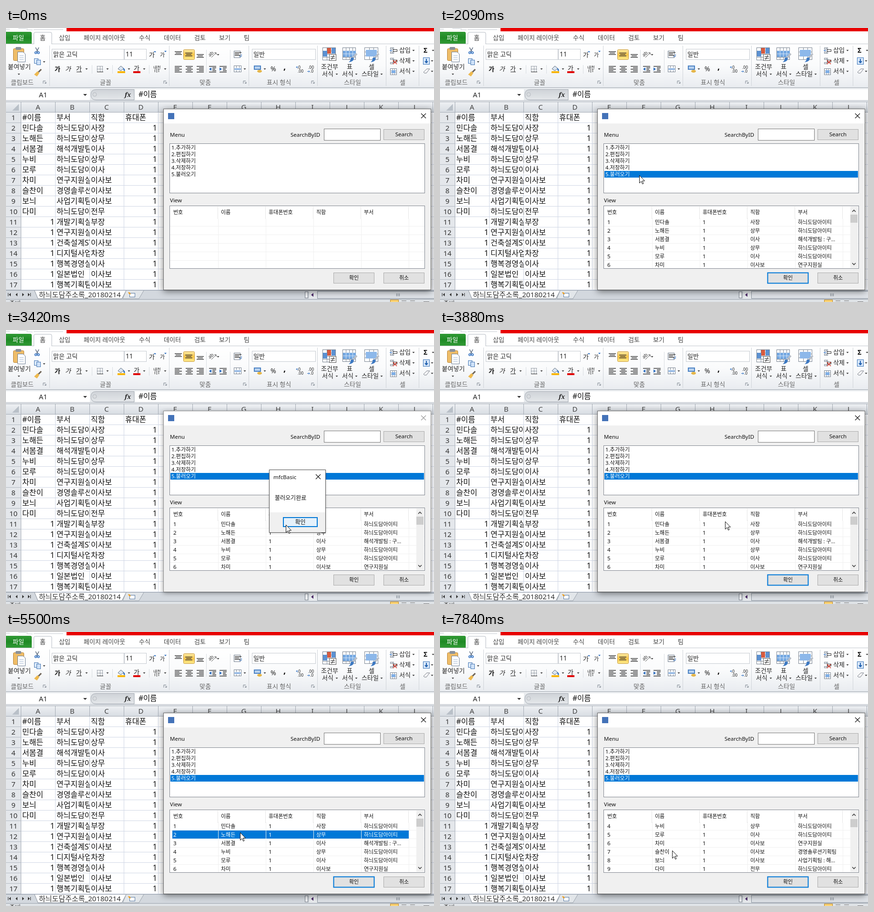
Write an HTML page that moves like this. It is 898 px wide and 577 px high and loops after 8 s.

```html
<!DOCTYPE html>
<html lang="ko">
<head>
<meta charset="utf-8">
<style>
html, body { margin: 0; width: 100%; height: 100%; overflow: hidden; background: #fff; }
svg { display: block; width: 898px; height: 577px; }
text { font-family: "Noto Sans", "Noto Sans CJK KR", "Noto Sans CJK JP", sans-serif; white-space: pre; }
</style>
</head>
<body>
<svg id="stage" viewBox="0 0 898 577" xmlns="http://www.w3.org/2000/svg"></svg>
<script>
const LOOP = 8000, BLUE = '#0078d7';
const range = n => [...Array(n).keys()];

// Markup helpers
const rect = (x, y, w, h, fill, more = '') => `<rect x="${x}" y="${y}" width="${w}" height="${h}" fill="${fill}" ${more}/>`;
const box = (x, y, w, h, fill, stroke, more = '') => rect(x + .5, y + .5, w - 1, h - 1, fill, `stroke="${stroke}" ${more}`);
const path = (d, stroke, width = 1, fill = 'none') => `<path d="${d}" fill="${fill}" stroke="${stroke}" stroke-width="${width}"/>`;
const shape = (d, fill) => `<path d="${d}" fill="${fill}"/>`;
const text = (x, y, s, size = 13, fill = '#222', more = '') => `<text x="${x}" y="${y}" font-size="${size}" fill="${fill}" ${more}>${s}</text>`;
const mid = 'text-anchor="middle"', end = 'text-anchor="end"';
const hline = (x, y, w, c) => rect(x, y, w, 1, c);
const vline = (x, y, h, c) => rect(x, y, 1, h, c);
const drop = (x, y) => shape(`M${x - 2.5} ${y - 1}h5l-2.5 3z`, '#444');
const cross = (x, y, id) => `<path ${id ? `id="${id}"` : ''} d="M${x - 5} ${y - 5}l10 10m0-10l-10 10" stroke="#111" stroke-width="1.1"/>`;

const people = [
  ['민다솔', '사장', '하늬도담아이티'], ['노해든', '상무', '하늬도담아이티'],
  ['서봄결', '이사', '해석개발팀 : 구...'], ['누비', '상무', '하늬도담아이티'],
  ['모루', '이사', '하늬도담아이티'], ['차미', '이사보', '연구지원실'],
  ['슬찬이', '이사보', '경영솔루션기획팀'], ['보늬', '이사보', '사업기획팀 : 해...'],
  ['다미', '전무', '하늬도담아이티']];
const extra = [['개발기획실', '부장'], ['연구지원실', '이사보'], ['건축설계ST', '이사보'], ['디지털사업', '차장'],
  ['행복경영실', '이사'], ['일본법인', '이사보'], ['행복기획팀', '이사보']];

function defs() {
  const fade = (id, ...stops) => `<linearGradient id="${id}" x2="0" y2="1">${stops.map((c, i) =>
    `<stop offset="${i / (stops.length - 1)}" stop-color="${c}"/>`).join('')}</linearGradient>`;
  const clip = (id, x, y, w, h) => `<clipPath id="${id}">${rect(x, y, w, h, '#000')}</clipPath>`;
  return `<defs>${fade('ribbon', '#fff', '#fafbfc', '#e9ecf0')}${fade('file', '#319a35', '#1f8a25', '#319a35')}
    ${fade('head', '#eef0f3', '#d7dce2')}${fade('pill', '#cfd3d8', '#e4e7ea')}${fade('hot', '#fde9a5', '#fbc749', '#fdeb8f')}
    ${clip('colB', 104, 178, 72, 375)}${clip('rows', 344, 399, 516, 106)}</defs>`;
}

// Ribbon icons
const bars = (x, y, widths) => widths.map((w, i) => rect(x + (15 - w) / 2, y + i * 3, w, 1.4, '#333')).join('');
const leftBars = (x, y, widths) => widths.map((w, i) => rect(x, y + i * 3, w, 1.4, '#333')).join('');
const grid = (x, y, w, h, nx, ny, fill = '#fff', line = '#7d8794') => box(x, y, w, h, fill, line) +
  range(nx - 1).map(i => vline(x + Math.round((i + 1) * w / nx), y, h, line)).join('') +
  range(ny - 1).map(i => hline(x, y + Math.round((i + 1) * h / ny), w, line)).join('');
const brush = (x, y) => path(`M${x + 13} ${y - 14}L${x + 4} ${y - 4}`, '#b9bec6', 4) +
  shape(`M${x + 6} ${y - 6}q3 8-10 10q5-4 4-9z`, '#3d79c2');

function ribbon() {
  const tabs = [[111, '삽입'], [163, '페이지 레이아웃'], [279, '수식'], [331, '데이터'], [395, '검토'], [447, '보기'], [499, '팀']];
  const groups = [[10, '클립보드'], [197, '글꼴'], [406, '맞춤'], [547, '표시 형식'], [709, '스타일'], [826, '셀']];
  let s = rect(127, 0, 771, 7, '#e80000') + path('M0 2.5h8M26 .5h16M44 0v4h12M58 3.5h62', '#c5cad0') +
    rect(0, 33, 898, 92, 'url(#ribbon)') + hline(0, 33, 898, '#c3c8ce') + hline(0, 125, 898, '#a3a9b1') +
    rect(0, 126, 898, 30, '#e9ecef') +
    shape('M0 8H51q3 0 3 3V33H0z', 'url(#file)') + text(14, 25, '파일', 13, '#fff') +
    path('M58.5 34V12q0-3 3-3H93q3 0 3 3V34', '#b4bac2', 1, '#fff') + text(71, 25, '홈', 13, '#333') +
    tabs.map(([x, t]) => text(x, 25, t, 13, '#444')).join('') +
    groups.map(([x, t]) => text(x, 119, t, 13, '#666')).join('') +
    [91, 342, 509, 653, 797, 866].map(x => vline(x, 37, 85, '#d0d4d9')).join('') +
    [81, 334, 501, 644].map(x => path(`M${x - 3} 117v-5.5h5m-2 2l3 3m0-3v3h-3`, '#7c858f')).join('') +
    [[27, 97], [80, 71], [240, 56], [287, 56], [169, 86], [213, 86], [258, 86], [290, 86], [334, 86], [445, 56], [501, 86],
     [641, 56], [543, 86], [694, 97], [735, 97], [788, 97], [855, 47], [855, 69], [855, 91], [896, 47], [894, 69], [894, 91]]
      .map(p => drop(...p)).join('');
  // Clipboard
  s += box(15, 43, 23, 26, '#efbd68', '#b98335', 'rx="2"') + rect(20, 40, 12, 6, '#8b929b', 'rx="2"') +
    path('M24.5 50.5H36L40.5 55V71.5H24.5z', '#6e7f95', 1, '#fff') + path('M28 58h9m-9 4h9m-9 4h9', '#9fb4d0') +
    text(4, 86, '붙여넣기') +
    path('M62 41l5 9m2-9l-5 9', '#57667a', 1.5) + `<g fill="none" stroke="#2f6fc0" stroke-width="1.6"><circle cx="62.5" cy="52" r="2"/><circle cx="68" cy="52" r="2"/></g>` +
    box(59, 64, 9, 11, '#dceafb', '#4a7ab5') + box(64, 67, 9, 11, '#cfe2f8', '#4a7ab5') +
    path('M74 87l-6 6', '#6d6255', 3) + shape('M66 91l4 4-5 7-6-4z', '#edb94f');
  // Font
  s += box(96, 44, 152, 23, '#fff', '#c6cbd1') + box(248, 44, 47, 23, '#fff', '#c6cbd1') +
    text(99, 60, '맑은 고딕') + text(251, 60, '11', 13.5) +
    text(300, 61, '가') + shape('M310 51l2.5-3 2.5 3z', '#2f6fc0') + text(323, 61, '가', 11) + shape('M332 48h5l-2.5 3z', '#2f6fc0') +
    text(102, 91, '가', 13, '#111', 'font-weight="700"') + text(124, 91, '가', 13, '#222', 'font-style="italic"') +
    text(147, 90, '가') + hline(148, 92, 11, '#222') +
    [180, 223, 300].map(x => vline(x, 78, 18, '#d9dde1')).join('') +
    path('M191.5 80v13m6-13v13m5-13v13m-12-12.5h13m-13 6h13', '#9aa1aa', 1) + hline(191, 92, 13, '#222') +
    path('M235 86l6-6 6 5-6 5z', '#5d6b7c', 1, '#dbe6f3') + shape('M246 84q5 3 3 7q-3 0-3-7z', '#2f6fc0') + rect(234, 91, 16, 4, '#f8b500') +
    text(268, 89, '가') + rect(267, 91, 15, 4, '#e00000') +
    text(309, 86, '내천', 8.5) + path('M312.5 87v6m4-6v7m4-7v6', '#333');
  // Alignment
  s += box(372, 45, 24, 22, 'url(#hot)', '#c99a3b', 'rx="2"') +
    bars(354, 49, [15, 11, 15]) + bars(376, 52, [15, 11, 15]) + bars(400, 55, [15, 11, 15]) +
    leftBars(354, 80, [15, 10, 15, 10, 15]) + bars(377, 80, [15, 9, 15, 9, 15]) +
    range(5).map(i => rect(400 + i % 2 * 5, 80 + i * 3, 15 - i % 2 * 5, 1.4, '#333')).join('') +
    [420, 470].map(x => vline(x, 46, 48, '#d9dde1')).join('') +
    text(425, 58, 'ab', 10, '#333', 'transform="rotate(-40 430 56)"') + path('M431 62l10-10m-4 0h4v4', '#555') +
    [426, 448].map((x, i) => bars(x, 80, [15, 0, 0, 0, 15]) + leftBars(x + 7, 83, [8, 6, 8]) +
      shape(i ? `M${x} 83v7l5-3.5z` : `M${x + 5} 83v7l-5-3.5z`, '#2f6fc0')).join('') +
    box(478, 48, 14, 15, '#fff', '#6f7c8c') + leftBars(480, 51, [14, 9, 12]) + path('M494 55v5h-5', '#2f6fc0') +
    grid(478, 79, 16, 14, 3, 3) + rect(479, 84, 14, 5, '#cfe1f6') + path('M480 86.5h12', '#2f6fc0');
  // Number
  s += box(516, 44, 134, 23, '#fff', '#c6cbd1') + text(519, 60, '일반') +
    rect(520, 79, 15, 9, '#4d83c4') + rect(522, 81, 11, 5, '#b8d2ef') + `<ellipse cx="532" cy="91" rx="5" ry="3" fill="#e5b64a"/>` +
    text(555, 91, '%', 14) + text(582, 88, ',', 18, '#111', 'font-weight="700"') +
    text(611, 86, '.0', 8.5) + text(612, 94, '.00', 8.5) + path('M613 82.5h-4m2-2l-2 2 2 2', '#2f6fc0') +
    text(634, 86, '.00', 8.5) + text(638, 94, '.0', 8.5) + path('M632 91.5h5m-2-2l2 2-2 2', '#2f6fc0');
  // Styles
  s += grid(664, 41, 28, 27, 3, 4) + rect(674, 42, 8, 12, '#d85b3e') + rect(665, 48, 9, 12, '#5b91d2') + rect(683, 42, 8, 12, '#5b91d2') +
    box(678, 55, 15, 14, '#fff', '#555') + path('M681 60h9m-9 4h9m-2-7l-5 10', '#222') +
    grid(706, 41, 28, 26, 4, 4) + rect(707, 48, 27, 13, '#76a9e2') + path('M707 54.5h27M713.5 48v13m7-13v13m7-13v13', '#d4e5f8') + brush(723, 68) +
    grid(752, 41, 29, 26, 3, 3) + rect(755, 46, 23, 14, '#8db8ea') + brush(769, 68) +
    text(661, 86, '조건부') + text(663, 101, '서식') + text(715, 86, '표') + text(705, 101, '서식') + text(761, 86, '셀') + text(746, 101, '스타일');
  // Cells and editing
  s += ['삽입', '삭제', '서식'].map((t, i) => {
    const y = 41 + i * 22;
    return text(825, y + 10, t) + (i < 2 ? grid(806, y, 8, 4, 2, 1) + grid(806, y + 9, 8, 4, 2, 1) + box(812, y + 4, 9, 5, '#fff', '#333') : grid(806, y, 14, 14, 3, 3) + rect(809, y + 4, 8, 6, '#7eaee6')) +
      (i === 1 ? path(`M812 ${y + 5}l8 8m0-8l-8 8`, '#d4392b', 1.6) : i ? '' : path(`M805 ${y + 6.5}h6m-3-2l-2 2 2 2`, '#2f6fc0'));
  }).join('') + text(876, 52, 'Σ', 14, '#111', 'font-weight="700"') +
    box(875, 62, 14, 15, '#d9e8fa', '#3b75b8') + path('M882 65v8m-3-3l3 3 3-3', '#1f5fae', 2) +
    path('M876 93l7-7h6l-7 9h-4z', '#7a8089', 1, '#f4f4f6');
  // Formula bar
  s += rect(0, 129, 176, 23, '#fff') + text(69, 146, 'A1', 14.5) + shape('M162 139h8l-4 4z', '#333') +
    path('M269 129.5H189q-11 0-11 11t11 11H269z', '#a7adb5', 1, 'url(#pill)') + `<circle cx="186" cy="140" r="4" fill="#d9dcdf" stroke="#b5bac0"/>` +
    text(249, 145, 'fx', 13, '#222', 'style="font-family:\'Noto Serif\',serif;font-style:italic;font-weight:700"') +
    rect(270, 129, 628, 23, '#fff') + text(278, 145, '#이름', 15.5, '#111') + hline(0, 152, 898, '#b4bac2');
  return s;
}

function sheet() {
  const rowY = i => 178 + 22 * i;
  const cell = (x, i, s, more = '') => text(x, rowY(i) + 16, s, 16, '#111', more);
  let s = rect(0, 156, 898, 22, 'url(#head)') + rect(0, 178, 32, 375, '#e4e7eb') + hline(0, 155, 898, '#a5acb5') + hline(0, 177, 898, '#a5acb5') +
    shape('M13 174h14v-14z', '#b9c0c8') + vline(31, 156, 397, '#a5acb5');
  range(12).forEach(i => {
    const x = 103 + 72 * i;
    s += vline(x, 156, 21, '#a5acb5') + vline(x, 178, 375, '#d0d7e5') + text(x - 36, 172, 'ABCDEFGHIJKL'[i], 15, '#444', mid);
  });
  range(17).forEach(i => {
    s += hline(0, rowY(i) + 21, 32, '#b3bac3') + hline(32, rowY(i) + 21, 866, '#d0d7e5') + text(15.5, rowY(i) + 16, i + 1, 15, '#333', mid);
  });
  s += cell(34, 0, '#이름') + cell(106, 0, '부서') + cell(178, 0, '직함') + cell(250, 0, '휴대폰');
  const one = (x, i) => cell(x, i, '1', end);
  const entries = [...people, ...extra.map(([team, rank]) => [null, rank, team])];
  entries.forEach(([name, rank, team], k) => {
    const i = k + 1;
    s += (name ? cell(34, i, name) : one(102, i)) + `<g clip-path="url(#colB)">${cell(106, i, team.split(' ')[0])}</g>` + cell(178, i, rank) + one(317, i);
  });
  // Sheet tabs, scroll bar and status bar
  s += rect(0, 553, 898, 18, '#d3d8de') + hline(0, 552, 898, '#9aa2ac') +
    path('M4.5 558v7m47-7v7', '#333') + shape('M10 558v7l-4-3.5zM24 558v7l-4-3.5zM34 558v7l4-3.5zM46 558v7l4-3.5z', '#333') +
    path('M60 553l7 17H243l9-17', '#8a929c', 1, '#fff') + text(69, 567, '하늬도담주소록_20180214', 15, '#333', 'font-weight="300"') +
    path('M252 553l-7 17h34l10-17', '#9aa2ac', 1, '#e2e6ea') + box(259, 558, 12, 9, '#fff', '#5878a0') + shape('M256 556l4 1 2 4-4-1z', '#f0a020') +
    box(627, 555, 7, 14, '#eef0f3', '#7d858f') + rect(636, 554, 262, 16, '#e8ebee') + shape('M645 558v8l-5-4z', '#4c2a68') +
    box(653, 554, 260, 16, '#dfe3e8', '#8d96a1') + path('M819.5 559v6m3-6v6m3-6v6', '#757e89') +
    hline(0, 571, 898, '#9aa2ac') + rect(0, 572, 898, 5, '#dfe3e7') + text(7, 584, '준비', 13, '#444') +
    box(806, 572, 18, 8, '#fbd476', '#c18a2a') + path('M830 574.5h10m8 0h10m18 2h12', '#777');
  return s;
}

function dialog() {
  const button = (x, y, label, size, id = '') => `<rect ${id ? `id="${id}"` : ''} x="${x + .5}" y="${y + .5}" width="85" height="22" fill="#e1e1e1" stroke="#adadad"/>` +
    text(x + 43, y + 15, label, size, '#111', mid);
  const menu = ['추가하기', '편집하기', '삭제하기', '저장하기', '불러오기'];
  let s = `<g id="frame">${box(330, 170, 562, 382, '#f0f0f0', 'currentColor')}</g>` + rect(331, 171, 560, 30, '#fff') +
    rect(340, 179, 13, 13, '#4472b8') + cross(876, 185, 'close') +
    text(344, 229, 'Menu', 11.5, '#111') + text(597, 229, 'SearchByID', 11.5, '#111') + text(344, 367, 'View', 11.5, '#111') +
    box(667, 212, 119, 25, '#fff', '#7a7a7a') + button(792, 213, 'Search', 11.5) +
    box(343, 243, 536, 105, '#fff', '#828790') + `<rect id="pick" x="345" y="301" width="532" height="14" fill="${BLUE}"/>` +
    menu.map((t, i) => text(347, 256 + 14 * i, `${i + 1}.${t}`, 11.3, '#111', i === 4 ? 'id="pickText"' : '')).join('') +
    box(343, 374, 536, 133, '#fff', '#828790');
  s += range(5).map(i => hline(344, 417 + 18 * i, 534, '#f0f0f0') + vline(444 + 100 * i, 376, 26, '#e5e5e5') + vline(445 + 100 * i, 402, 104, '#f0f0f0')).join('') +
    ['번호', '이름', '휴대폰번호', '직함', '부서'].map((t, i) => text(351 + 100 * i, 392, t, 11, '#111')).join('');
  const rows = people.map(([name, rank, team], i) => {
    const y = 413 + 18 * i;
    return `<g class="row"><rect x="349" y="${y - 13}" width="496" height="17" fill="none"/>` +
      range(4).map(c => vline(445 + 100 * c, y - 13, 17, '#f0f0f0')).join('') +
      [i + 1, name, 1, rank, team].map((t, c) => `<text x="${351 + 100 * c}" y="${y}" font-size="${c % 2 || c === 4 ? 11 : 11.5}">${t}</text>`).join('') + '</g>';
  }).join('');
  s += `<g id="filled"><g clip-path="url(#rows)"><g id="scroll">${rows}</g></g>` + rect(861, 376, 16, 129, '#f0f0f0') +
    `<rect id="thumb" x="861" y="393" width="15" height="17" fill="#cdcdcd"/>` + path('M865 387l3.5-3.5 3.5 3.5M865 495l3.5 3.5 3.5-3.5', '#444', 1.6) + '</g>';
  return s + button(687, 515, '확인', 11, 'ok') + button(792, 515, '취소', 11);
}

const message = () => `<g id="message"><g style="filter:drop-shadow(0 1px 2px rgba(0,0,0,.2))">${box(552, 294, 119, 133, '#fff', '#555')}</g>` +
  rect(553, 384, 117, 42, '#f0f0f0') + text(561, 314, 'mfcBasic', 11.5, '#111') + cross(655, 309) + text(564, 358, '불러오기완료', 12, '#111') +
  `<rect id="confirm" x="582" y="395" width="71" height="19" stroke="${BLUE}" stroke-width="2"/>` + text(617.5, 408.5, '확인', 12, '#111', mid) + '</g>';

const pointer = `<path id="cursor" d="M.5.5V16.5L4.2 13 6.8 18.5 9 17.5 6.5 12H11.5Z" fill="#fff" stroke="#111"/>`;

document.getElementById('stage').innerHTML = defs() + rect(0, 0, 898, 577, '#fff') + ribbon() + sheet() + dialog() + message() + pointer;
const el = id => document.getElementById(id);
const rowEls = [...document.querySelectorAll('.row')];

// Pointer moves: start, end, steps, target x, target y
const moves = [
  [690, 1230, 8, 418, 310], [3110, 3420, 5, 587, 410], [3490, 3640, 3, 598, 403], [3950, 4180, 4, 560, 386], [4260, 4410, 3, 526, 410],
  [4730, 4810, 2, 521, 430], [5040, 5120, 2, 507, 430], [5500, 6116, 9, 44, 198], [6193, 6270, 2, 58, 222],
  [6350, 6500, 3, 62, 247], [6580, 6650, 2, 65, 261], [6820, 7440, 9, 462, 460], [7760, 7840, 2, 487, 460]];

const progress = (t, a, b, n) => Math.min(1, (Math.floor((t - a) * (n - 1) / (b - a) + .01) + 1) / n);

function pointerAt(t) {
  let x = 742, y = 517;
  for (const [a, b, n, tx, ty] of moves) {
    if (t < a) break;
    const p = progress(t, a, b, n), e = p * p * (3 - 2 * p);
    x += (tx - x) * e;
    y += (ty - y) * e;
  }
  return [Math.round(x), Math.round(y)];
}

// Message opacity: stepped fade in, then out
function messageAlpha(t) {
  if (t < 2560 || t >= 3880) return 0;
  if (t < 2790) return [.42, .75, .93][Math.min(2, Math.floor((t - 2560) / 76.6))];
  return t < 3720 ? 1 : t < 3800 ? .6 : .25;
}

function show(id, on) { el(id).style.display = on ? '' : 'none'; }

function render(t) {
  const [x, y] = pointerAt(t), alpha = messageAlpha(t);
  const active = t < 2560 || t >= 3720, picked = t >= 1860;
  const over = (left, top, right, bottom) => t >= 690 && x >= left && x < right && y >= top && y < bottom;
  const face = hover => hover ? '#e5f1fb' : '#e1e1e1';
  show('cursor', t >= 690);
  el('cursor').setAttribute('transform', `translate(${x} ${y})`);

  show('pick', picked);
  el('pickText').setAttribute('fill', picked ? '#fff' : '#111');
  el('close').setAttribute('stroke', active ? '#111' : '#999');
  el('frame').style.color = active ? '#666' : '#8c8c8c';
  el('frame').style.filter = active ? 'drop-shadow(0 3px 7px rgba(0,0,0,.5))' : 'drop-shadow(0 2px 5px rgba(0,0,0,.4))';

  const hover = over(687, 515, 773, 538);
  const focus = picked && active, ok = el('ok');
  ok.setAttribute('fill', face(hover));
  ok.setAttribute('stroke', hover || focus ? BLUE : '#adadad');
  ok.setAttribute('stroke-width', focus ? 2 : 1);
  el('confirm').setAttribute('fill', face(over(581, 394, 654, 415)));

  show('filled', t >= 2090);
  const selected = t < 4580 ? -1 : t < 5270 ? 0 : 1;
  rowEls.forEach((row, i) => {
    row.setAttribute('fill', i === selected ? '#fff' : '#111');
    row.firstChild.setAttribute('fill', i === selected ? BLUE : 'none');
  });
  const scrolled = t >= 7440;
  el('scroll').setAttribute('transform', `translate(0 ${scrolled ? -54 : 0})`);
  el('thumb').setAttribute('y', scrolled ? 394 : 393);

  const scale = .92 + .08 * Math.min(1, alpha + (1 - alpha) * .35);
  show('message', alpha > 0);
  el('message').setAttribute('opacity', alpha);
  el('message').setAttribute('transform', `translate(611 360) scale(${scale}) translate(-611 -360)`);
}

const start = performance.now();
function tick() {
  render((performance.now() - start) % LOOP);
  requestAnimationFrame(tick);
}
render(0);
requestAnimationFrame(tick);
</script>
</body>
</html>
```
